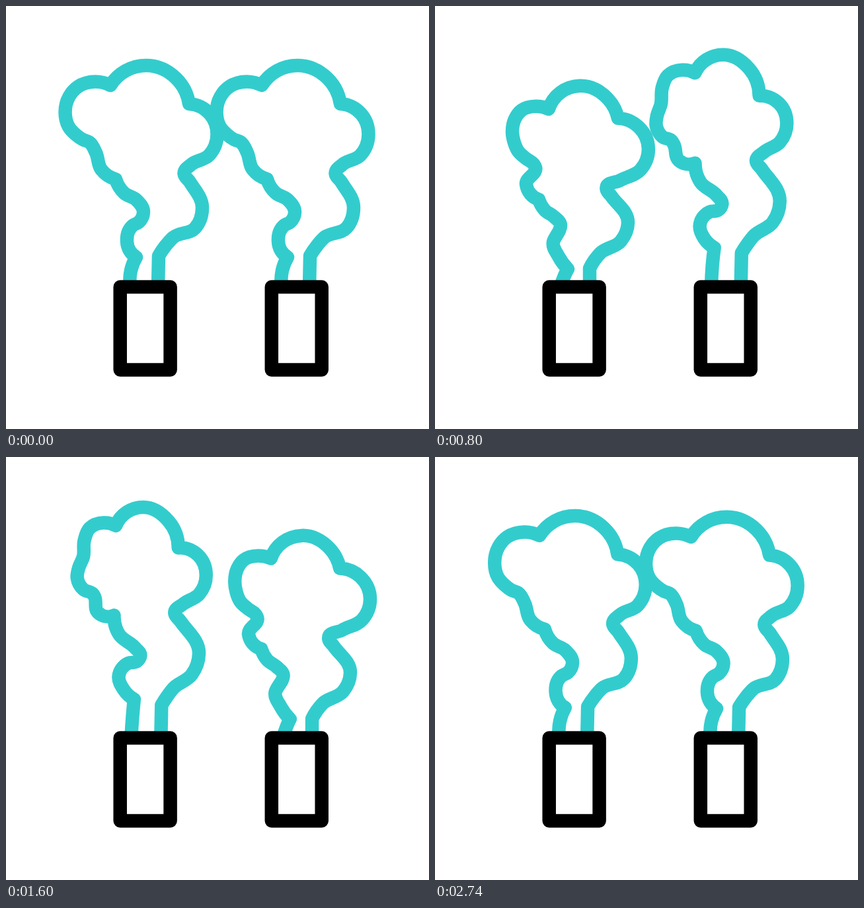
Write an HTML page that moves like this. It is 640 px wide and 640 px high and loops after 2760 ms.

```html
<!DOCTYPE html>
<html lang="en">
<head>
<meta charset="utf-8">
<title>Smoking chimneys</title>
<style>
  html, body { margin: 0; width: 100%; height: 100%; overflow: hidden; background: #fff; }
  svg { display: block; width: 100%; height: 100%; }
  path, rect { fill: none; stroke-width: 20.5; stroke-linejoin: round; }
  path { stroke: #33cccd; }
  rect { stroke: #000; }
</style>
</head>
<body>
<svg viewBox="0 0 640 640">
  <path id="left"/>
  <path id="right" transform="translate(229 0)"/>
  <rect x="172.7" y="425" width="75.9" height="125.4"/>
  <rect x="401.8" y="425" width="75.9" height="125.4"/>
</svg>
<script>
const LOOP = 2760;
const CORNERS = [0, 2, 10, 21, 25, 36, 37];

const parse = text => text.trim().split(/\s+/).map(p => p.split(',').map(Number));
const mix = (a, b, k) => a.map((p, i) => p.map((v, j) => v + (b[i][j] - v) * k));

// Centre line of the smoke, from the left foot round to the right foot
const rest = parse(`188,425 189,400 197,380 187,370 183,356 192,332 201,327 208,312 197,293
  179,283 166,262 144,247 136,222 126,206 116,202 106,195 95,183 89.5,160 95.5,137 109,122
  135,114.5 158,120 181,98 213,90 257,109 277,148 308,163 319.5,194 307,226 280,240
  269.5,253 278,266 297,305 286,336 253,350 242,362 231,378 230,425`);
const tall = parse(`189,425 189,385 190,350 173,337 166,319 186,293 203,293 210.5,284 203,272
  174,247 167,211 140,217 124.5,194 122.5,190.5 106,184 98,163 105,146 117,130 117,103 124,81
  145,71.5 163,76 179,58 202,52 237,73 252,120 281,130 292,158 282,186 262,200
  253,214 262,227 292,281 281,315 255,337 246,349 236,364 234.5,425`);
const low = parse(`190,425 196,408 201,398 187,379 179,357 184,347 188,340 190,332 180,319
  166,309 157,293 138,270 151.5,243 149,239 138,231 126,220 120,207 117,190 121,171 131,158
  152,152 172,156 190,131 219,121 262,141 277,170 308,183 323,217 311,248 280,264
  259.5,277 267,288 292,328 281,356 250,374 241,385 234,397 234,425`);
const squat = mix(tall, low, 1.12);

const plumes = [
  { el: document.getElementById('left'),
    keys: [[0, rest], [650, squat], [2030, tall], [LOOP, rest]] },
  { el: document.getElementById('right'),
    keys: [[0, rest], [550, mix(rest, tall, 0.8)], [1820, mix(rest, squat, 1.05)], [LOOP, rest]] }
];

const sub = (a, b) => [a[0] - b[0], a[1] - b[1]];
const dot = (a, b) => a[0] * b[0] + a[1] * b[1];
const unit = v => { const n = Math.hypot(...v) || 1; return [v[0] / n, v[1] / n]; };

// Tangent at b of the circle through a, b and c
function tangent(a, b, c) {
  const u = sub(b, a), v = sub(c, b);
  const m = dot(u, u) || 1, n = dot(v, v) || 1;
  return unit([u[0] / m + v[0] / n, u[1] / m + v[1] / n]);
}

function mirror(t, chord) {
  const k = 2 * dot(t, chord);
  return [k * chord[0] - t[0], k * chord[1] - t[1]];
}

// Smooth run of near-circular cubics between two corners
function run(pts) {
  const n = pts.length - 1;
  const chords = pts.slice(1).map((p, i) => unit(sub(p, pts[i])));
  if (n === 1) return 'L' + pts[1];
  const tan = pts.map((p, i) => i && i < n ? tangent(pts[i - 1], p, pts[i + 1]) : null);
  tan[0] = mirror(tan[1], chords[0]);
  tan[n] = mirror(tan[n - 1], chords[n - 1]);
  let d = '';
  for (let i = 0; i < n; i++) {
    const a = pts[i], b = pts[i + 1], len = Math.hypot(...sub(b, a));
    const reach = t => len * 2 / 3 / Math.max(0.6, 1 + dot(t, chords[i]));
    const p = reach(tan[i]), q = reach(tan[i + 1]);
    d += 'C' + [a[0] + tan[i][0] * p, a[1] + tan[i][1] * p,
                b[0] - tan[i + 1][0] * q, b[1] - tan[i + 1][1] * q, ...b].map(v => v.toFixed(2));
  }
  return d;
}

function outline(pts) {
  let d = 'M' + pts[0];
  for (let i = 1; i < CORNERS.length; i++) d += run(pts.slice(CORNERS[i - 1], CORNERS[i] + 1));
  return d;
}

function pose(keys, t) {
  const i = keys.findIndex(k => t < k[0]);
  const [t0, a] = keys[i - 1], [t1, b] = keys[i];
  return mix(a, b, (t - t0) / (t1 - t0));
}

function draw() {
  const t = performance.now() % LOOP;
  for (const { el, keys } of plumes) el.setAttribute('d', outline(pose(keys, t)));
  requestAnimationFrame(draw);
}
draw();
</script>
</body>
</html>
```
